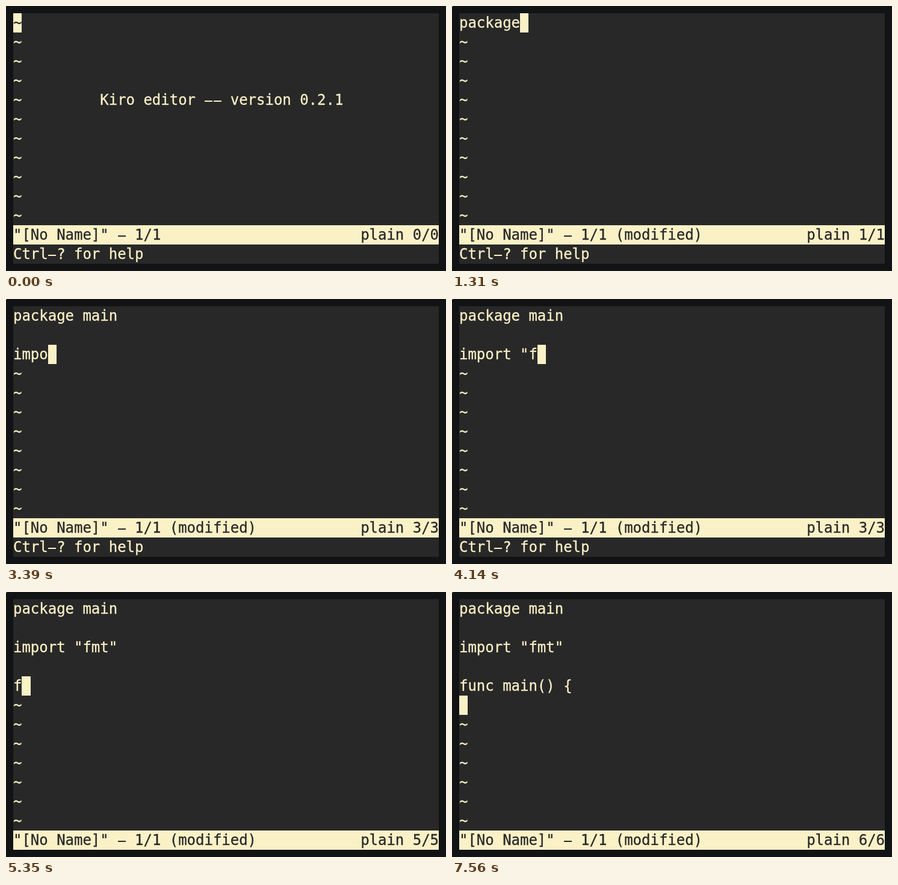
Write an HTML page that moves like this. It is 731 px wide and 440 px high and loops after 8 s.

```html
<!DOCTYPE html>
<html lang="en">
<head>
<meta charset="utf-8">
<title>Typing in a terminal editor</title>
<style>
  :root { --paper: #282828; --ink: #fbf1c7; --cell: 14.4286px; }
  html, body { margin: 0; width: 100%; height: 100%; overflow: hidden; background: #111314; }
  #screen {
    position: absolute; left: 12px; top: 12px; width: 707px; height: 416px;
    overflow: hidden; background: var(--paper); color: var(--ink);
    font: 24px/32px "DejaVu Sans Mono", "Liberation Mono", monospace;
    letter-spacing: -.02px; font-variant-ligatures: none;
    -webkit-text-stroke: .3px;
  }
  .row { height: 32px; white-space: pre; position: relative; }
  .bar, .cursor { background: var(--ink); color: var(--paper); }
  .cursor { position: absolute; top: 0; width: 14.43px; height: 32px; }
  .right { position: absolute; right: 0; top: 0; }
  .dash {
    background: linear-gradient(currentColor, currentColor) 50% 58% / 13px 2px no-repeat;
    -webkit-text-fill-color: transparent; -webkit-text-stroke: 0;
  }
  #corner { position: absolute; left: 0; top: 0; width: 1px; height: 1px; background: #fff; }
</style>
</head>
<body>
<div id="screen"></div>
<div id="corner"></div>
<script>
const LOOP = 8000, CELL = 707 / 49, HELP_ENDS = 4820;
const screen = document.getElementById("screen");
const corner = document.getElementById("corner");

// Each burst: the keys pressed, then the time of each press.
const bursts = [
  ["package ", 630, 750, 1000, 1080, 1150, 1230, 1310, 1440],
  ["main", 1630, 1710, 1800, 1880],
  ["\n\n", 2260, 2450],
  ["import ", 3210, 3290, 3370, 3370, 3450, 3640, 3770],
  ['"fmt"', 4020, 4140, 4260, 4320, 4570],
  ["\n\n", 4760, 5020],
  ["func", 5350, 5410, 5610, 5740],
  [" main", 5940, 6050, 6170, 6280, 6390],
  ["() {\n", 6650, 6710, 7040, 7300, 7560]
];
const keys = bursts.flatMap(([text, ...times]) => times.map((at, i) => ({ at, key: text[i] })));

const dashes = s => s.replace(/-/g, '<span class="dash">-</span>');
const row = (html, cls = "") => `<div class="row ${cls}">${html}</div>`;
const cursor = (col, ch) => `<span class="cursor" style="left:${col * CELL}px">${ch}</span>`;

function draw(typed, help) {
  const lines = typed ? typed.split("\n") : [];
  const last = lines.length - 1;
  const height = help ? 11 : 12;
  let html = "";
  for (let y = 0; y < height; y++) {
    let text = y <= last ? lines[y] : "~";
    if (!typed && y === 4) text = "~".padEnd(10) + "Kiro editor -- version 0.2.1";
    text = dashes(text);
    if (typed && y === last) text += cursor(lines[y].length, " ");
    if (!typed && y === 0) text = cursor(0, "~");
    html += row(text);
  }
  const count = lines.length;
  const name = dashes('"[No Name]" - 1/1' + (typed ? " (modified)" : ""));
  html += row(`${name}<span class="right">plain ${count}/${count}</span>`, "bar");
  if (help) html += row(dashes("Ctrl-? for help"));
  screen.innerHTML = html;
}

let shown = "", start;
function tick(now) {
  start ??= now;
  const t = (now - start) % LOOP;
  const typed = keys.filter(k => k.at <= t).map(k => k.key).join("");
  const help = t < HELP_ENDS;
  const state = typed + "|" + help;
  if (state !== shown) draw(typed, help);
  shown = state;
  corner.hidden = t < 60;
  requestAnimationFrame(tick);
}
draw("", true);
requestAnimationFrame(tick);
</script>
</body>
</html>
```
